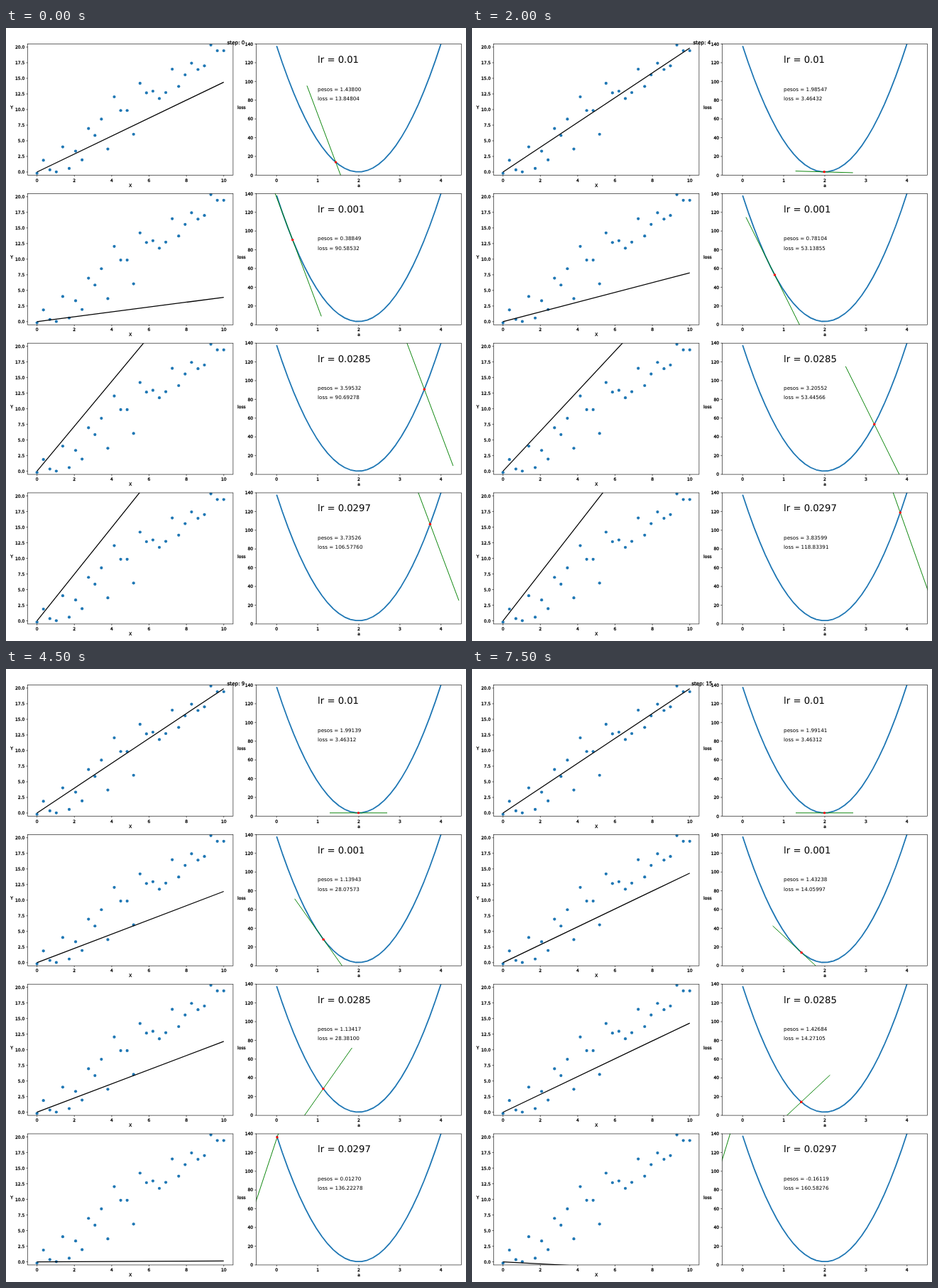
An HTML page for the animation above (8000 ms loop, 648x864 px).

```html
<!DOCTYPE html>
<html lang="en">
<head>
<meta charset="utf-8">
<title>Gradient descent with four learning rates</title>
<style>
  html, body { margin: 0; width: 100%; height: 100%; overflow: hidden; background: #fff; }
  svg { display: block; width: 648px; height: 864px; }
  text { font-family: "DejaVu Sans", sans-serif; font-size: 6px; white-space: pre; text-rendering: geometricPrecision; }
  .heavy { stroke: #000; stroke-width: .3; }
  .note { font-size: 7.2px; }
  .rate { font-size: 13.2px; }
  .frame { fill: none; stroke: #000; stroke-width: .6; }
  .curve { fill: none; stroke: #1f77b4; stroke-width: 1.8; stroke-linejoin: round; }
  .fit { stroke: #000; stroke-width: 1.25; }
  .slope { stroke: #008000; stroke-width: .95; }
  .dot { fill: #1f77b4; }
  .mark { fill: #f00; }
</style>
</head>
<body>
<svg id="stage" viewBox="0 0 648 864" xmlns="http://www.w3.org/2000/svg"></svg>
<script>
const STEP_MS = 500, STEPS = 16;
const RATES = ["0.01", "0.001", "0.0285", "0.0297"];

// loss(a) = FLOOR + K * (a - BEST)^2, where K is the mean of x^2
const K = 5900 / 174, BEST = 1.991411, FLOOR = 3.463121, START = -1.7195366;
const loss = a => FLOOR + K * (a - BEST) ** 2;

const W = 289.4, H = 184.9, LEFT = 30.5, RIGHT = 352.3, TOP = 22.5, PITCH = 210.85;
const YS = [-.2, 1.88, .35, .02, 4.02, .58, 3.34, 1.94, 6.96, 5.86, 8.47, 3.68, 12.04, 9.85, 9.85,
  6.05, 14.2, 12.67, 12.95, 11.76, 12.72, 16.47, 13.71, 15.56, 17.43, 16.41, 17, 20.33, 19.42, 19.42];

const stage = document.getElementById("stage");

function add(parent, tag, attrs, text) {
  const el = document.createElementNS("http://www.w3.org/2000/svg", tag);
  set(el, attrs);
  if (text !== undefined) el.textContent = text;
  parent.appendChild(el);
  return el;
}

function set(el, attrs) {
  for (const key in attrs) el.setAttribute(key, attrs[key]);
}

function label(x, y, text, anchor = "middle", cls = "heavy") {
  return add(stage, "text", { x, y, "text-anchor": anchor, class: cls }, text);
}

// Axes box with ticks; returns its scales and a clipped layer
function axes(id, left, top, xr, yr, xTicks, yTicks, digits, xName, yName) {
  const px = v => left + (v - xr[0]) / (xr[1] - xr[0]) * W;
  const py = v => top + H - (v - yr[0]) / (yr[1] - yr[0]) * H;
  const box = { x: left, y: top, width: W, height: H };
  add(add(stage, "clipPath", { id }), "rect", box);
  const layer = add(stage, "g", { "clip-path": `url(#${id})` });
  const bottom = top + H;
  let d = "";
  for (const v of xTicks) {
    d += `M${px(v)} ${bottom}v2.1`;
    label(px(v), bottom + 9.1, v);
  }
  for (const v of yTicks) {
    d += `M${left} ${py(v)}h-2.1`;
    label(left - 4.2, py(v) + 2.2, v.toFixed(digits), "end");
  }
  add(stage, "path", { d, class: "frame" });
  add(stage, "rect", { ...box, class: "frame" });
  label(left + W / 2, bottom + 16.2, xName);
  label(left - (yName === "Y" ? 22.4 : 20.4), top + 91.7, yName);
  return { px, py, layer };
}

const range = (n, gap) => Array.from({ length: n }, (_, i) => i * gap);

function makeRow(rate, r) {
  const top = TOP + PITCH * r;
  const data = axes("data" + r, LEFT, top, [-.5, 10.5], [-.5, 20.5], range(6, 2), range(9, 2.5), 1, "X", "Y");
  YS.forEach((y, i) => add(data.layer, "circle",
    { cx: data.px(i * 10 / 29), cy: data.py(y), r: 2.1, class: "dot" }));
  const fit = add(data.layer, "line", { class: "fit" });

  const cost = axes("cost" + r, RIGHT, top, [-.5, 4.5], [0, 140], range(5, 1), range(8, 20), 0, "a", "loss");
  const points = range(30, 4 / 29).map(a => cost.px(a) + "," + cost.py(loss(a))).join(" ");
  add(cost.layer, "polyline", { points, class: "curve" });
  const slope = add(cost.layer, "line", { class: "slope" });
  const mark = add(cost.layer, "circle", { r: 1.7, class: "mark" });
  const note = (y, cls, text) => label(cost.px(1), cost.py(y), text, "start", cls);
  note(120, "rate", "lr = " + rate);
  const weight = note(90, "note"), value = note(80, "note");

  const factor = 1 - 2 * K * rate;
  return step => {
    const before = START * factor ** step;
    const a = BEST + before * factor, l = loss(a);
    // the drawn slope is the gradient that led to this step
    const rise = 2 * K * before * .7;
    set(fit, { x1: data.px(0), y1: data.py(0), x2: data.px(10), y2: data.py(10 * a) });
    set(slope, { x1: cost.px(a - .7), y1: cost.py(l - rise), x2: cost.px(a + .7), y2: cost.py(l + rise) });
    set(mark, { cx: cost.px(a), cy: cost.py(l) });
    weight.textContent = "pesos = " + a.toFixed(5);
    value.textContent = "loss = " + l.toFixed(5);
  };
}

const rows = RATES.map(makeRow);
const title = label(324, 22.9, "", "middle", "note heavy");

let shown = -1;
const began = performance.now();

function draw(now) {
  const step = Math.floor(Math.max(0, now - began) / STEP_MS) % STEPS;
  if (step !== shown) {
    shown = step;
    title.textContent = "step: " + step;
    rows.forEach(update => update(step));
  }
  requestAnimationFrame(draw);
}
draw(began);
</script>
</body>
</html>
```
